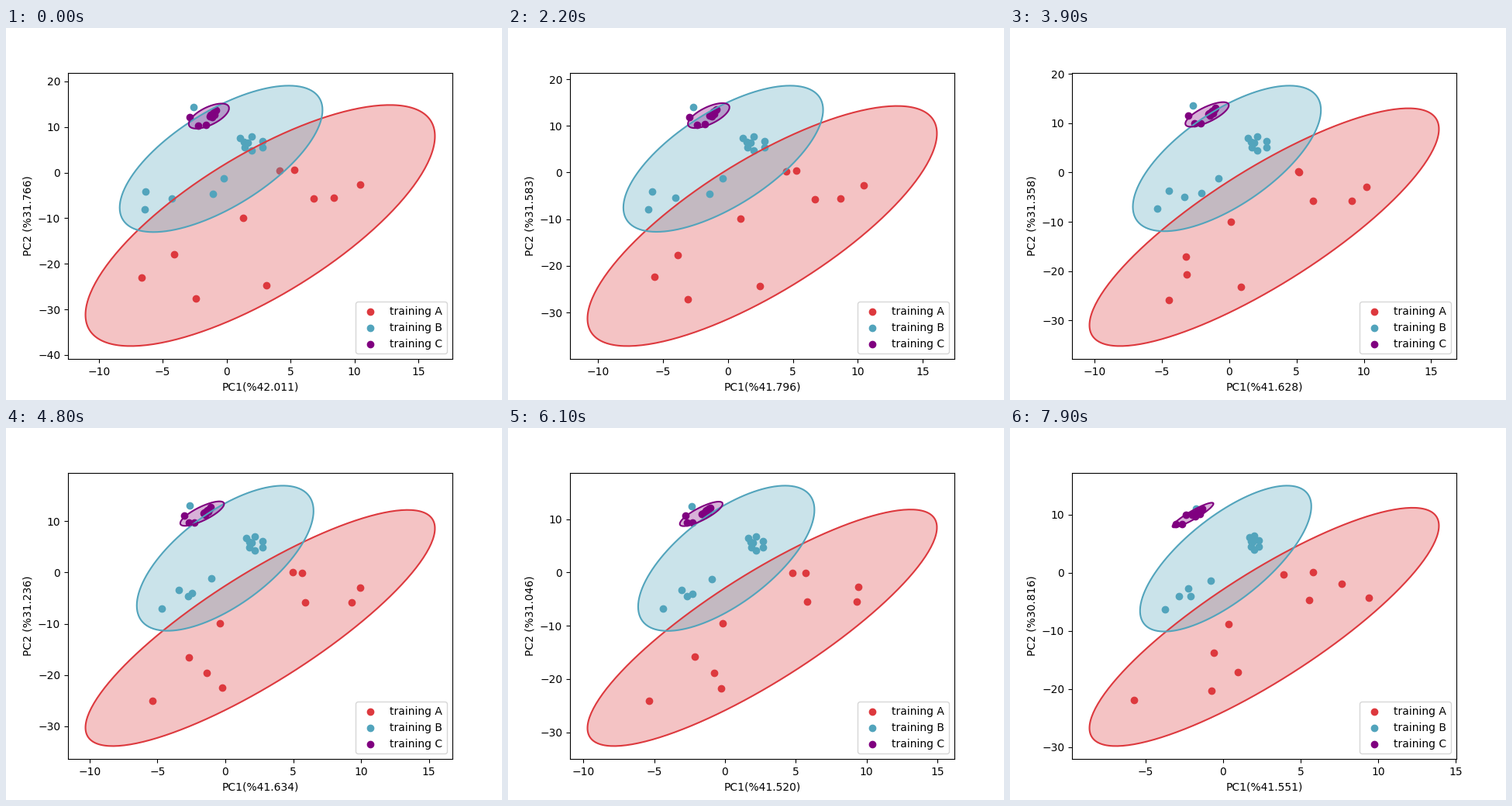
Animation, 640 px wide and 480 px high, one loop 8000 ms. Source, as a matplotlib script:

```python
import numpy as np
import matplotlib.pyplot as plt
from matplotlib.animation import FuncAnimation

FRAMES = 80
RED, BLUE, PURPLE = "#dd393e", "#52a4bc", "purple"
RADIUS = np.sqrt(-2 * np.log(0.05))  # 95 % ellipse in two dimensions
ORIGIN_Y = 186.5

# Global curves, linear between the key times
KEYS = [0, 14, 31, 48, 61, 71, 79]
POSE = [0, 0.05, 0.36, 1, 1.2, 1.27, 2]
SHARE_1 = [42.011, 41.951, 41.622, 41.634, 41.520, 41.431, 41.551]
SHARE_2 = [31.766, 31.687, 31.466, 31.236, 31.046, 30.944, 30.816]
ORIGIN_X = [284.8, 284.3, 285, 283, 280.2, 279.8, 274.7]
SCALE_X = [16.47, 16.47, 16.44, 17.5, 18.17, 18.4, 20.05]
SCALE_Y = [5.88, 5.92, 6.12, 6.6, 6.86, 7.0, 7.5]

# Each point passes through three screen positions: start, middle, end.
PATHS_A = [
    [(217, 292), (236, 296), (263, 290)],
    [(175, 322), (259, 316), (294, 315)],
    [(245, 349), (189, 352), (160, 351)],
    [(306, 245), (276, 252), (282, 253)],
    [(336, 332), (279, 335), (260, 339)],
    [(372, 183), (370, 186), (353, 189)],
    [(353, 184), (382, 187), (391, 186)],
    [(397, 220), (386, 225), (386, 222)],
    [(423, 219), (446, 225), (463, 219)],
    [(457, 202), (457, 206), (428, 201)],
]
PATHS_B = [
    [(242, 102), (237, 100), (240, 104)],
    [(281, 194), (265, 194), (259, 197)],
    [(267, 214), (240, 213), (233, 217)],
    [(214, 220), (235, 217), (218, 217)],
    [(180, 211), (223, 209), (230, 207)],
    [(179, 234), (201, 233), (200, 234)],
]
PATHS_C = [
    [(237, 115), (230, 113), (227, 112)],
    [(248, 126), (236, 122), (214, 124)],
    [(258, 125), (243, 122), (222, 124)],
]

# Tight clusters keep their shape while the centre moves and the width changes.
SHAPE_B = np.array([(-13.6, -6.6), (-8.6, -1.6), (-7.6, 5.4), (-3.6, -0.6),
                    (1.4, -8.6), (1.4, 9.4), (15.4, -2.6), (15.4, 5.4)])
step = np.arange(8)
u = np.linspace(-1, 1, 8)
SHAPE_C = np.column_stack([4 * u, 2.5 * np.cos(2 * np.pi * (step - 2) / 3) - 4 * u])


def cluster(shape, centres, widths):
    stops = [np.add(c, shape * [w, 1]) for c, w in zip(centres, widths)]
    return np.stack(stops, axis=1)


GROUPS = [
    ("training A", RED, np.array(PATHS_A)),
    ("training B", BLUE, np.concatenate([PATHS_B, cluster(
        SHAPE_B, [(315.6, 148.6), (319.8, 148.5), (314.4, 147.6)], [1, 0.72, 0.4])])),
    ("training C", PURPLE, np.concatenate([PATHS_C, cluster(
        SHAPE_C, [(267.4, 110.9), (259.5, 107.9), (241.6, 109.6)], [1, 1.18, 1.7])])),
]


def at(curve, frame):
    return np.interp(frame, KEYS, curve)


def positions(paths, frame):
    """Data coordinates of a group's points."""
    pose = at(POSE, frame)
    i = min(int(pose), 1)
    screen = paths[:, i] + (pose - i) * (paths[:, i + 1] - paths[:, i])
    x = (screen[:, 0] - at(ORIGIN_X, frame)) / at(SCALE_X, frame)
    y = (ORIGIN_Y - screen[:, 1]) / at(SCALE_Y, frame)
    return np.array([x, y])


def ellipse(points):
    a = np.linspace(0, 2 * np.pi, 241)
    root = np.linalg.cholesky(np.cov(points))
    return points.mean(axis=1, keepdims=True) + RADIUS * root @ [np.cos(a), np.sin(a)]


fig, ax = plt.subplots(figsize=(6.4, 4.8), dpi=100)


def draw(frame):
    ax.clear()
    for label, color, paths in GROUPS:
        points = positions(paths, frame)
        outline = ellipse(points)
        ax.scatter(*points, color=color, label=label)
        ax.fill(*outline, color=color, alpha=0.3, linewidth=0)
        ax.plot(*outline, color=color, linewidth=1.5, solid_capstyle="butt")
    ax.set_xlabel(f"PC1(%{at(SHARE_1, frame):.3f})")
    ax.set_ylabel(f"PC2 (%{at(SHARE_2, frame):.3f})")
    ax.legend(loc="lower right")
    return []


anim = FuncAnimation(fig, draw, frames=FRAMES, init_func=lambda: [],
                     interval=100, repeat=True, repeat_delay=0)
plt.show()
```
